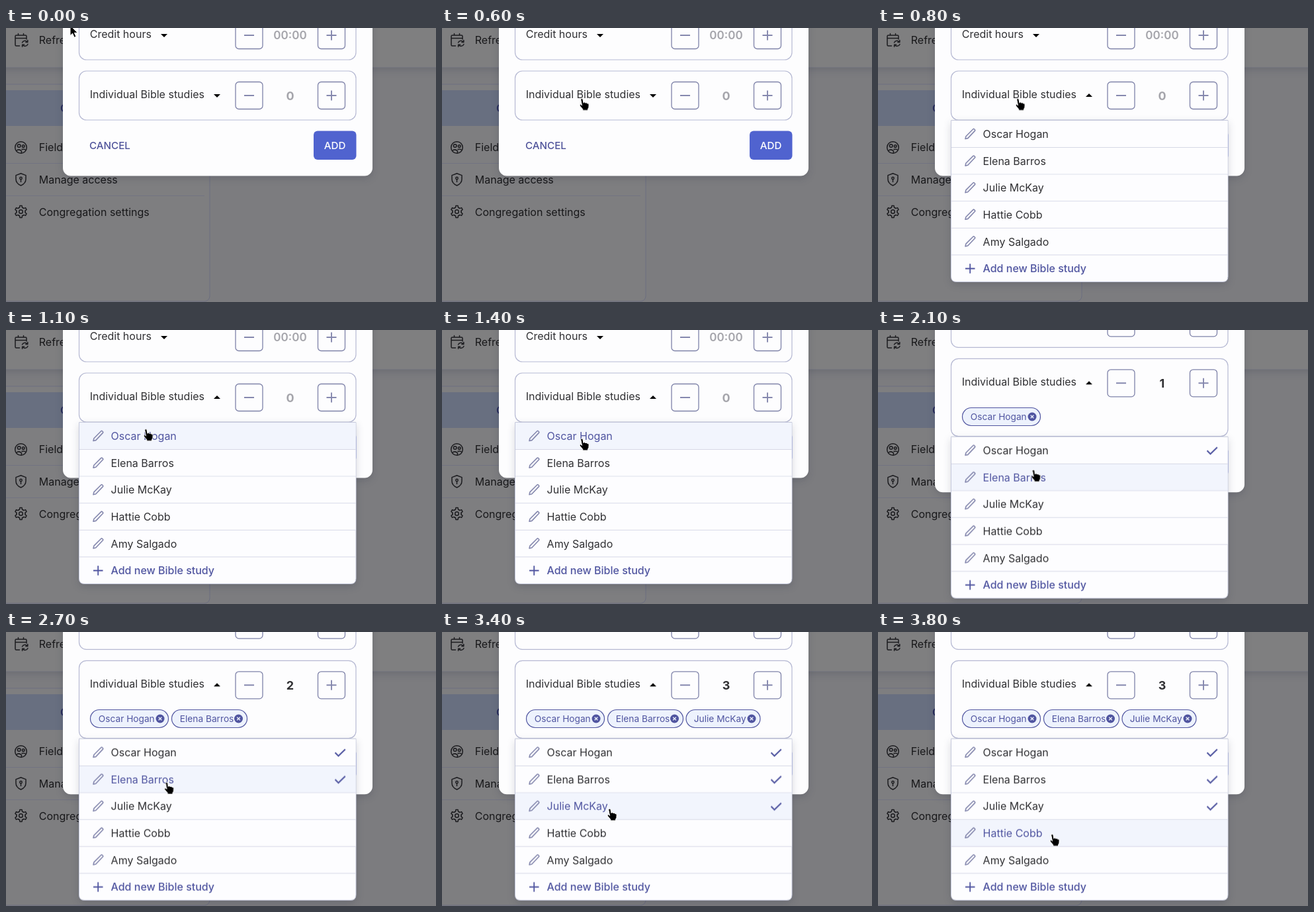
Recreate the animation shown at these times as an HTML page. Size 650x414 px, loop 3900 ms.

```html
<!DOCTYPE html>
<html lang="en">
<head>
<meta charset="utf-8">
<title>Individual Bible studies</title>
<style>
:root {
  --ink: #303033;
  --accent: #5055a0;
  --soft: #8588ae;
  --line: #b6b9d3;
  --paper: #fdfdff;
  --hover: #f2f5fd;
}
html, body { margin: 0; width: 100%; height: 100%; overflow: hidden; background: #7c7c7f; }
.stage { display: block; width: 100vw; height: 100vh; color: var(--ink); }
text { font: 400 16px Inter, sans-serif; fill: currentColor; }
.nav { color: #18181a; }
.icon { fill: none; stroke: #1c1c1f; stroke-width: 1.5; stroke-linecap: round; stroke-linejoin: round; }
.box { fill: none; stroke: var(--line); stroke-width: 1.2; }
.btn { fill: none; stroke: #7f83a9; stroke-width: 1.3; }
.sign { fill: none; stroke: var(--soft); stroke-width: 1.9; }
.num { font-size: 18px; font-weight: 700; text-anchor: middle; }
.zero { fill: #a5a5ab; }
.time { font-size: 17px; font-weight: 600; }
.label { font-size: 15.2px; font-weight: 550; }
.shade { filter: drop-shadow(0 4px 6px rgba(20, 22, 50, .16)); }
.row { --bg: var(--paper); }
.row rect { fill: var(--bg); }
.row path { fill: none; stroke: #d6d8e6; }
.add { color: var(--accent); }
.add text { font-weight: 550; }
.tick { fill: none; stroke: var(--accent); stroke-width: 2.1; }
.chip { color: var(--accent); }
.chip rect { fill: #edf2fd; stroke: var(--accent); stroke-width: 1.2; }
.chip text { font-size: 13.7px; }

/* Timeline: 3.9 s, everything held between steps */
.drop, .rise, .grow, .open, .shut, .pick1, .pick2, .pick3,
.n0, .n1, .n2, .h1, .h2, .h3, .h4, .cursor, .arrow, .hand {
  animation: 3.9s step-end infinite;
}
.drop { animation-name: drop; }
.rise { animation-name: rise; }
.grow { animation-name: grow; height: 74px; }
.open { animation-name: open; }
.shut { animation-name: shut; }
.pick1 { animation-name: pick1; }
.pick2 { animation-name: pick2; }
.pick3 { animation-name: pick3; }
.n0 { animation-name: n0; }
.n1 { animation-name: n1; }
.n2 { animation-name: n2; }
.h1 { animation-name: h1; }
.h2 { animation-name: h2; }
.h3 { animation-name: h3; }
.h4 { animation-name: h4; }
.cursor { animation-name: cursor; }
.arrow { animation-name: arrow; }
.hand { animation-name: hand; }

@keyframes drop { 0% { transform: none; } 43.58%, 100% { transform: translateY(21.7px); } }
@keyframes rise { 0% { transform: none; } 43.58%, 100% { transform: translateY(-21.7px); } }
@keyframes grow { 0% { height: 74px; } 43.58%, 100% { height: 117.4px; } }
@keyframes open { 0% { opacity: 0; } 20.5%, 100% { opacity: 1; } }
@keyframes shut { 0% { opacity: 1; } 20.5%, 100% { opacity: 0; } }
@keyframes pick1 { 0% { opacity: 0; } 43.58%, 100% { opacity: 1; } }
@keyframes pick2 { 0% { opacity: 0; } 69.22%, 100% { opacity: 1; } }
@keyframes pick3 { 0% { opacity: 0; } 87.17%, 100% { opacity: 1; } }
@keyframes n0 { 0% { opacity: 1; } 46.14%, 100% { opacity: 0; } }
@keyframes n1 { 0% { opacity: 0; } 46.14% { opacity: 1; } 69.22%, 100% { opacity: 0; } }
@keyframes n2 { 0% { opacity: 0; } 69.22% { opacity: 1; } 87.17%, 100% { opacity: 0; } }
@keyframes h1 {
  28.19% { color: var(--accent); --bg: var(--hover); }
  53.83%, 100% { color: var(--ink); --bg: var(--paper); }
}
@keyframes h2 {
  53.83% { color: var(--accent); --bg: var(--hover); }
  76.91%, 100% { color: var(--ink); --bg: var(--paper); }
}
@keyframes h3 {
  76.91% { color: var(--accent); --bg: var(--hover); }
  92.29%, 100% { color: var(--ink); --bg: var(--paper); }
}
@keyframes h4 {
  92.29%, 100% { color: var(--accent); --bg: var(--hover); }
}
@keyframes cursor {
  0% { transform: translate(97px, -4px); animation-timing-function: steps(3); }
  7.68% { transform: translate(150px, 118px); animation-timing-function: steps(3); }
  15.37% { transform: translate(211px, 106.5px); }
  20.5% { transform: translate(211px, 106.5px); animation-timing-function: steps(4); }
  30.76% { transform: translate(211px, 164px); }
  46.14% { transform: translate(211px, 164px); animation-timing-function: steps(4); }
  56.4% { transform: translate(242.5px, 227px); }
  71.78% { transform: translate(242.5px, 227px); animation-timing-function: steps(4); }
  82.04% { transform: translate(253px, 267px); }
  87.17% { transform: translate(253px, 267px); animation-timing-function: steps(4); }
  97.42%, 100% { transform: translate(263px, 305.5px); }
}
@keyframes arrow { 0% { opacity: 1; } 10.24%, 100% { opacity: 0; } }
@keyframes hand { 0% { opacity: 0; } 10.24%, 100% { opacity: 1; } }
</style>
</head>
<body>
<svg class="stage" viewBox="0 0 650 414">
  <defs>
    <g id="pencil" fill="none" stroke="#8588ae" stroke-width="1.6" stroke-linejoin="round">
      <path d="M132 27.500l.9-3.800L143.800 12.800q.8-.8 1.600 0l1 1q.8.8 0 1.600L135.800 26.600z" style="stroke:inherit"/>
    </g>
    <path id="tick" class="tick" style="stroke:var(--accent)" d="M497.500 20.500l5 5L512.800 15.500"/>
    <g id="close">
      <circle r="6.500" fill="#5055a0"/>
      <path d="M-2.300-2.300l4.600 4.600M2.300-2.300l-4.600 4.600" stroke="#edf2fd" stroke-width="1.400"/>
    </g>
    <g id="stepper">
      <rect class="btn" x="347" y="-20.500" width="41" height="41" rx="5"/>
      <rect class="btn" x="471.500" y="-20.500" width="41" height="41" rx="5"/>
      <path class="sign" d="M360 0h15M484.500 0h15M492-7.500v15"/>
    </g>
    <path id="tooth" d="M-3.300-5.700L-2-6.300-1.600-9h3.200L2-6.300l1.300.6"/>
  </defs>

  <!-- dimmed page -->
  <rect width="650" height="414" fill="#7c7c7f"/>
  <rect class="shade" x="-20" y="-20" width="690" height="79" fill="#7f7f80"/>
  <path d="M0 59.500h650" stroke="#74757f"/>
  <rect x="-20" y="85" width="328" height="328" rx="8" fill="#7e7e80" stroke="#6c6e80"/>
  <rect x="-10" y="94" width="310" height="54" fill="#686f80"/>
  <path d="M0 204.500h300M0 253.500h300" stroke="#727382"/>
  <g class="nav">
    <text x="49.800" y="24">Refresh</text>
    <text x="82" y="126.500" style="font-weight:600;fill:#282c5c">C</text>
    <text x="49.800" y="186">Field</text>
    <text x="49.800" y="235">Manage access</text>
    <text x="49.800" y="283.500">Congregation settings</text>
  </g>
  <g class="icon">
    <path d="M31 17v-4.500q0-1.500-1.500-1.500h-14q-1.500 0-1.500 1.500v13q0 1.500 1.500 1.500h5M14 15.500h17M18.500 8.500V11M26.500 8.500V11"/>
    <path d="M24.500 22a4.500 4.500 0 0 1 8-.5M32.800 18.500v3h-3M33 24.500a4.500 4.500 0 0 1-8 .8M24.600 28.300v-3h3"/>
    <circle cx="22.500" cy="180.500" r="8.800"/>
    <circle cx="19.700" cy="178" r="2.300"/>
    <circle cx="26.200" cy="178.500" r="1.800"/>
    <path d="M15.500 185.500q4-3.500 8 .5v3M24 183.500q3-1.500 6 1"/>
    <path d="M22.500 219.800l7.500 2.800v5.600q0 6.500-7.500 9.800-7.500-3.300-7.500-9.800v-5.600z"/>
    <circle cx="22.500" cy="227" r="1.700"/>
    <path d="M22.500 229v3.500"/>
    <g transform="translate(22.500 277.500)">
      <use href="#tooth"/>
      <use href="#tooth" transform="rotate(60)"/>
      <use href="#tooth" transform="rotate(120)"/>
      <use href="#tooth" transform="rotate(180)"/>
      <use href="#tooth" transform="rotate(240)"/>
      <use href="#tooth" transform="rotate(300)"/>
      <circle r="2.800"/>
    </g>
  </g>

  <!-- dialog -->
  <g class="drop">
    <rect class="shade" x="86" y="-80" width="468" height="303.500" rx="12" fill="#fdfdfe"/>
    <text class="label" x="126" y="182.500" style="fill:#4f539a">CANCEL</text>
    <rect x="465" y="155.500" width="64.500" height="43.500" rx="6" fill="#5063cf"/>
    <text class="label" x="497.200" y="182.500" text-anchor="middle" style="fill:#fff">ADD</text>
  </g>
  <g class="rise">
    <rect class="box" x="110.500" y="-60" width="418.500" height="108" rx="11"/>
    <text x="126.700" y="15.300">Credit hours</text>
    <path d="M234 9h10l-5 5z"/>
    <use href="#stepper" y="11"/>
    <text class="num zero time" x="429.500" y="17">00:00</text>

    <rect class="box grow" x="110.500" y="65" width="418.500" rx="11"/>
    <text x="126.700" y="106">Individual Bible studies</text>
    <path class="shut" d="M314 100h10l-5 5z"/>
    <path class="open" d="M314 104h10l-5-5z"/>
    <use href="#stepper" y="102"/>
    <text class="num zero n0" x="429.500" y="108.500">0</text>
    <text class="num n1" x="429.500" y="108.500">1</text>
    <text class="num n2" x="429.500" y="108.500">2</text>
    <text class="num pick3" x="429.500" y="108.500">3</text>
  </g>

  <!-- chosen names -->
  <g class="chip pick1">
    <rect x="127.500" y="117.500" width="118" height="27" rx="13.500"/>
    <text x="139.800" y="135.600">Oscar Hogan</text>
    <use href="#close" x="233" y="131"/>
  </g>
  <g class="chip pick2">
    <rect x="250.500" y="117.500" width="114" height="27" rx="13.500"/>
    <text x="262.800" y="135.600">Elena Barros</text>
    <use href="#close" x="351.500" y="131"/>
  </g>
  <g class="chip pick3">
    <rect x="369" y="117.500" width="112" height="27" rx="13.500"/>
    <text x="380.800" y="135.600">Julie McKay</text>
    <use href="#close" x="468" y="131"/>
  </g>

  <!-- list -->
  <g class="drop">
    <g class="open">
      <path class="shade" d="M110.500 139.500H529V375.500q0 8-8 8H118.500q-8 0-8-8z" fill="#fdfdff" stroke="#c6c9dc"/>
      <g class="row h1" transform="translate(0 140)">
        <rect x="111" width="417.500" height="40.600"/>
        <path d="M111 40.500h417.500"/>
        <use href="#pencil"/>
        <text x="158.600" y="26.300">Oscar Hogan</text>
        <use class="pick1" href="#tick"/>
      </g>
      <g class="row h2" transform="translate(0 180.600)">
        <rect x="111" y=".5" width="417.500" height="40"/>
        <path d="M111 40.500h417.500"/>
        <use href="#pencil"/>
        <text x="158.600" y="26.300">Elena Barros</text>
        <use class="pick2" href="#tick"/>
      </g>
      <g class="row h3" transform="translate(0 221.200)">
        <rect x="111" y=".5" width="417.500" height="40"/>
        <path d="M111 40.500h417.500"/>
        <use href="#pencil"/>
        <text x="158.600" y="26.300">Julie McKay</text>
        <use class="pick3" href="#tick"/>
      </g>
      <g class="row h4" transform="translate(0 261.800)">
        <rect x="111" y=".5" width="417.500" height="40"/>
        <path d="M111 40.500h417.500"/>
        <use href="#pencil"/>
        <text x="158.600" y="26.300">Hattie Cobb</text>
      </g>
      <g class="row" transform="translate(0 302.400)">
        <path d="M111 40.500h417.500"/>
        <use href="#pencil"/>
        <text x="158.600" y="26.300">Amy Salgado</text>
      </g>
      <g class="add">
        <path d="M132 363.500h14.500M139.200 356.300v14.500" stroke="currentColor" stroke-width="1.800"/>
        <text x="158.500" y="369.300">Add new Bible study</text>
      </g>
    </g>
  </g>

  <!-- pointer -->
  <g class="cursor" stroke="#fff" stroke-width="1" stroke-linejoin="round" fill="#000">
    <path class="arrow" d="M0 0v15.500l3.600-3.300 2.600 6 2.700-1.200-2.500-5.700h4.800z"/>
    <path class="hand" d="M-1.300 1.500Q-1.300 0 .2 0T2 1.500l.8 5q.4-1 1.700-.8 1.200.2 1.500 1.200.5-.7 1.600-.4t1.300 1.300q1-.5 1.700.2.600.6.500 1.800l-.2 3.700-1.400 2.700V18H1.700v-1.800L-2 11.800q-1.400-1.700-.6-2.600t2.300.4l.8.800z"/>
  </g>
</svg>
</body>
</html>
```
